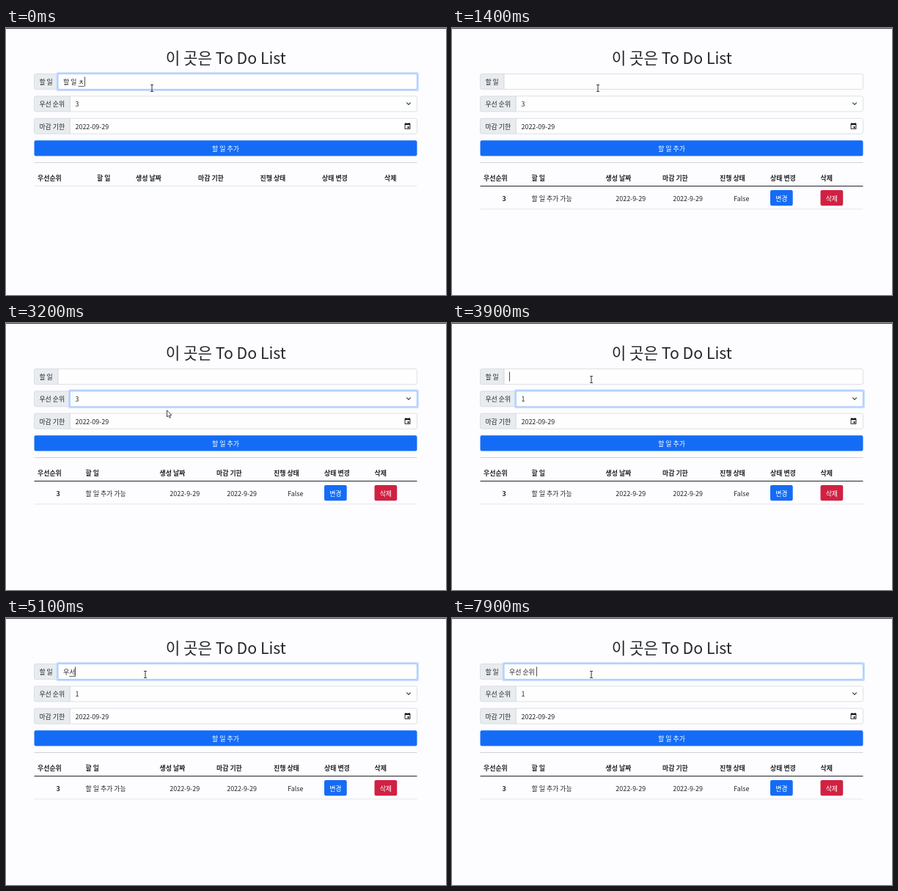
Write an HTML page with a canvas that moves like this. It is 600 px wide and 364 px high and loops after 8 s.

```html
<!DOCTYPE html>
<html lang="ko">
<head>
<meta charset="utf-8">
<title>To Do List</title>
<style>
  html, body { margin: 0; width: 100%; height: 100%; overflow: hidden; background: #fdfcfe; }
  canvas { display: block; }
</style>
</head>
<body>
<canvas id="stage" width="600" height="364"></canvas>
<script>
const ctx = document.getElementById('stage').getContext('2d');
const LOOP = 8000, STEP = 100;
const FONT = '"Noto Sans CJK KR", "Noto Sans", sans-serif';
const SIZE = 8.92;
const INK = '#212529', LINE = '#ced4da', BLUE = '#146cf6', RED = '#d02142', PAPER = '#fdfcfe';
const LEFT = 38.5, RIGHT = 560.5;

// Typing steps: [time, committed text, text being composed]
const typing = [
  [0, '할 일 ', 'ㅊ'], [100, '할 일 ', '추'], [200, '할 일 ', '축'], [300, '할 일 추', '가'],
  [400, '할 일 추가 ', ''], [600, '할 일 추가 ', 'ㄱ'], [700, '할 일 추가 ', '가'],
  [800, '할 일 추가 ', '간'], [1000, '할 일 추가 가', '느'], [1100, '할 일 추가 가', '능'],
  [1200, '할 일 추가 가능', ''], [1300, '', ''],
  [4800, '', 'ㅇ'], [4900, '', '우'], [5000, '', '웃'], [5100, '우', '서'], [5300, '우', '선'],
  [5500, '우선', ''], [5600, '우선 ', ''], [5800, '우선 ', 'ㅅ'], [5900, '우선 ', '수'],
  [6000, '우선 ', '순'], [6100, '우선 순', 'ㅇ'], [6200, '우선 순', '우'],
  [6300, '우선 순', '위'], [7800, '우선 순위 ', '']
];

// Pointer path: [time, x, y]
const path = [
  [0, 199, 82], [2200, 199, 82], [2400, 207, 84], [2700, 214, 103],
  [2850, 215, 104], [3050, 219.5, 119], [3350, 219.5, 119], [3750, 190, 77], [8000, 190, 77]
];

const headings = ['우선순위', '할 일', '생성 날짜', '마감 기한', '진행 상태', '상태 변경', '삭제'];
const emptyColumns = [43, 124, 177, 262, 346.5, 431, 516];
const filledColumns = [43, 108.5, 209.5, 287, 365, 434, 502.5];

const clamp = v => Math.max(0, Math.min(1, v));
const ramp = (t, start, length = 150) => clamp((t - start) / length);

function text(str, x, y, { size = SIZE, weight = 400, color = INK, align = 'left' } = {}) {
  ctx.font = `${weight} ${size}px ${FONT}`;
  ctx.textAlign = align;
  ctx.fillStyle = color;
  ctx.fillText(str, x, y);
}

function box(x, y, w, h, radius, fill, stroke) {
  ctx.beginPath();
  ctx.roundRect(x, y, w, h, radius);
  if (fill) { ctx.fillStyle = fill; ctx.fill(); }
  if (stroke) { ctx.strokeStyle = stroke; ctx.lineWidth = 0.7; ctx.stroke(); }
}

function rule(y, color, height) {
  ctx.fillStyle = color;
  ctx.fillRect(LEFT, y, RIGHT - LEFT, height);
}

function polyline(points, width, color) {
  ctx.beginPath();
  points.forEach(([x, y]) => ctx.lineTo(x, y));
  ctx.lineWidth = width;
  ctx.strokeStyle = color;
  ctx.stroke();
}

function field(label, split, y, focus) {
  const w = RIGHT - split, h = 21;
  box(LEFT, y, split - LEFT, h, [2.2, 0, 0, 2.2], '#e9ecef', LINE);
  box(split, y, w, h, [0, 2.2, 2.2, 0], '#fefefe', LINE);
  if (focus > 0) {
    ctx.globalAlpha = focus;
    box(split - 2.4, y - 2.4, w + 4.8, h + 4.8, 2.6, '#c2dafe');
    box(split, y, w, h, [0, 2.2, 2.2, 0], '#fefefe', '#86b7fe');
    ctx.globalAlpha = 1;
  }
  text(label, 45.4, y + 14.3);
}

function calendarIcon() {
  ctx.fillStyle = '#111';
  ctx.fillRect(544.8, 129.2, 1, 1.5);
  ctx.fillRect(549.2, 129.2, 1, 1.5);
  box(543.6, 130, 7.8, 8, 0.8, '#111');
  ctx.fillStyle = '#fefefe';
  ctx.fillRect(544.5, 132.2, 6, 5);
  ctx.fillStyle = '#111';
  ctx.fillRect(547.5, 134.3, 2.2, 2.2);
}

function caretVisible(t) {
  if (t < 1300) return true;
  if (t < 3900) return false;
  if (t < 4800) return t < 4400;
  return t < 6900 || t >= 7400;
}

function drawInput(t) {
  const [, done, composing] = typing.findLast(step => step[0] <= t);
  const x = 78, base = 76.9;
  text(done + composing, x, base);
  const start = x + ctx.measureText(done).width;
  const end = x + ctx.measureText(done + composing).width;
  ctx.fillStyle = INK;
  if (composing) ctx.fillRect(start, 79, end - start, 0.7);
  if (caretVisible(t)) ctx.fillRect(Math.round(end), 66.5, 0.8, 13);
}

function drawTable(filled) {
  const columns = filled ? filledColumns : emptyColumns;
  headings.forEach((h, i) => text(h, columns[i], 208, { weight: 700 }));
  if (!filled) return rule(215, '#dee2e6', 0.8);
  rule(215, '#30343a', 1.1);
  rule(246.5, '#dee2e6', 0.8);
  const base = 235.5;
  text('3', 71.2, base, { weight: 700, align: 'center' });
  text('할 일 추가 가능', 108.5, base);
  text('2022-9-29', 223.3, base);
  text('2022-9-29', 301.2, base);
  text('False', 384.2, base);
  [['변경', 434, BLUE], ['삭제', 502.5, RED]].forEach(([label, x, color]) => {
    box(x, 221, 30.7, 21.2, 2.2, color);
    text(label, x + 15.35, base, { color: '#fff', align: 'center' });
  });
}

function pointerAt(t) {
  const i = path.findIndex(p => p[0] > t);
  const [t0, x0, y0] = path[i - 1], [t1, x1, y1] = path[i];
  const k = (t - t0) / (t1 - t0), e = k * k * (3 - 2 * k);
  return [x0 + (x1 - x0) * e, y0 + (y1 - y0) * e];
}

function drawPointer(t) {
  const [x, y] = pointerAt(t);
  ctx.save();
  ctx.translate(x, y);
  if (y < 90) {
    polyline([[0, -4.5], [0, 4.5]], 1, '#333');
    polyline([[-2, -4.5], [2, -4.5]], 0.9, '#333');
    polyline([[-2, 4.5], [2, 4.5]], 0.9, '#333');
  } else {
    ctx.beginPath();
    [[0, 0], [0, 9], [2.1, 7.2], [3.6, 10.4], [5, 9.7], [3.6, 6.7], [6.3, 6.5]]
      .forEach(([px, py]) => ctx.lineTo(px, py));
    ctx.closePath();
    ctx.fillStyle = '#fff';
    ctx.fill();
    ctx.strokeStyle = '#333';
    ctx.lineWidth = 0.9;
    ctx.stroke();
  }
  ctx.restore();
}

function draw(t) {
  ctx.fillStyle = PAPER;
  ctx.fillRect(0, 0, 600, 364);
  ctx.fillStyle = '#3c3d40';
  ctx.fillRect(0, 0, 600, 1);
  text('이 곳은 To Do List', 299.7, 49, { size: 21.25, align: 'center' });

  const inputFocus = t < 1300 ? 1 : ramp(t, 3900);
  const selectFocus = ramp(t, 2700) - ramp(t, 3900);
  field('할 일', 71, 62.6, inputFocus);
  field('우선 순위', 87.3, 92.9, selectFocus);
  field('마감 기한', 87.3, 123.2, 0);
  drawInput(t);
  text(t < 3400 ? '3' : '1', 94.5, 107.2);
  polyline([[546.2, 101.7], [549, 104.5], [551.8, 101.7]], 1.1, '#343a40');
  text('2022-09-29', 94.5, 137.5);
  calendarIcon();

  box(LEFT, 153.2, RIGHT - LEFT, 21.2, 2.2, BLUE);
  text('할 일 추가', 299.5, 167.5, { color: '#fff', align: 'center' });
  rule(183.2, '#c8c9cb', 0.8);
  drawTable(t >= 1300);
  drawPointer(t);
}

function tick(now) {
  draw(Math.floor((now % LOOP) / STEP) * STEP);
  requestAnimationFrame(tick);
}
requestAnimationFrame(tick);
</script>
</body>
</html>
```
